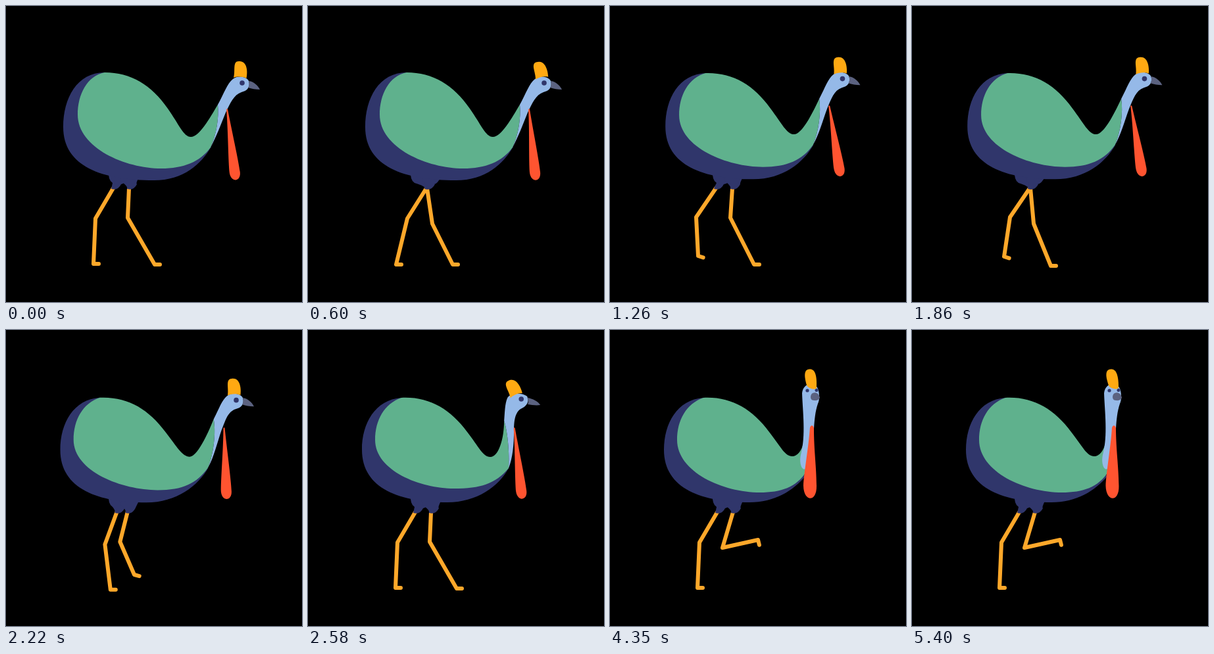
An HTML page that plays this animation: 450 px wide and 450 px high, repeating every 5.43 s.

```html
<!DOCTYPE html>
<html>
<head>
<meta charset="utf-8">
<style>
html, body { margin: 0; width: 100%; height: 100%; overflow: hidden; background: #000 }
svg { display: block; width: 100vw; height: 100vh }
.leg { fill: none; stroke: #ffa82a; stroke-width: 6; stroke-linecap: round; stroke-linejoin: round }
.navy { fill: #30366b }
</style>
</head>
<body>
<svg viewBox="0 0 450 450">
  <path id="legA" class="leg"/><path id="legB" class="leg"/>
  <path id="thighA" class="navy"/><path id="thighB" class="navy"/>
  <path id="body" class="navy"/>
  <path id="back" fill="#5fb18d"/>
  <path id="neck" fill="#95b9e8"/>
  <path id="beak" fill="#5b6280"/>
  <circle id="eye" class="navy"/><circle id="eye2" class="navy"/>
  <path id="casque" fill="#ffa912"/>
  <path id="wattle" fill="#ff5430"/>
</svg>
<script>
const LOOP = 5430, STEP = 30, STOP = 2400, CYCLE = 1200;
const el = id => document.getElementById(id);
const clamp = x => Math.max(0, Math.min(1, x));
const lerp = (a, b, k) => a + (b - a) * k;
const easeOut = x => 1 - (1 - clamp(x)) ** 3;
const easeInOut = x => (x = clamp(x)) < .5 ? 2 * x * x : 1 - 2 * (1 - x) ** 2;

// Interpolates every number in two strings of the same form.
function mix(a, b, k) {
  const nums = b.match(/-?[\d.]+/g);
  let i = 0;
  return a.replace(/-?[\d.]+/g, n => lerp(+n, +nums[i++], k).toFixed(2));
}

// Poses: head low, head high, upright, facing the viewer.
const shapes = {
  body: [
    'M150 101C108 101 87 140 87 184C87 244 146 265 225 265C270 265 297 240 312 214L200 200Z',
    'M142 103C102 106 82 142 82 182C82 242 141 262 212 262C258 262 292 236 307 209L200 200Z',
    'M142 103C102 106 82 142 82 182C82 242 141 262 212 262C256 262 290 238 305 210L200 200Z',
    'M142 103C102 106 82 142 82 182C82 242 141 262 212 262C250 262 278 245 298 221L200 200Z'],
  back: [
    'M150 101C190 101 221 120 246 156C263 180 270 199 281 199C294 199 310 170 322 150C324 170 320 195 311 215C295 237 270 247 236 247C182 247 109 216 109 165C109 135 123 106 150 101Z',
    'M142 103C184 101 216 120 242 155C260 178 268 192 279 192C290 192 305 160 315 134C319 155 315 188 307 208C290 233 268 243 230 243C176 243 102 215 102 167C102 137 116 112 142 103Z',
    'M142 103C184 101 216 120 242 155C260 178 266 193 277 193C290 193 298 165 298 138C305 160 306 195 305 210C285 234 262 241 222 241C171 241 102 214 102 167C102 137 116 112 142 103Z',
    'M142 103C184 101 216 120 242 155C260 178 266 192 277 192C285 192 291 184 294 172C302 185 300 205 298 216C283 239 260 247 228 247C172 247 102 216 102 167C102 137 116 112 142 103Z'],
  neck: [
    'M322 150C332 132 336 118 345 111C352 105 366 107 369 114C372 124 366 129 358 131C346 135 341 148 334 162C326 182 320 198 311 215C320 195 324 170 322 150Z',
    'M315 134C324 116 327 106 335 99C342 93 356 95 359 102C362 112 356 117 348 119C336 123 333 136 327 151C320 172 316 192 307 208C315 188 319 155 315 134Z',
    'M298 138C299 126 299 112 303 103C308 95 326 95 333 101C337 110 331 116 325 119C314 124 313 140 313 152C313 175 311 195 305 210C306 195 305 160 298 138Z',
    'M290 190C298 160 293 125 292 96C294 78 314 78 317 92C319 102 318 108 316 112C312 124 311 136 310 150C309 175 305 200 298 210C293 216 287 204 290 190Z'],
  beak: [
    'M369 114C377 115 383 121 386 127C380 127 373 126 368 124C370 121 370 117 369 114Z',
    'M359 102C367 103 373 109 376 115C370 115 363 114 358 112C360 109 360 105 359 102Z',
    'M333 103C341 104 350 109 353 114C347 115 340 114 334 113C335 110 335 106 333 103Z',
    'M306 98C309 93 318 95 319 103C319 104 316 108 310 107C305 107 304 102 306 98Z'],
  casque: [
    ...Array(3).fill('M-10 -1C-7 -12 -12 -26 -2 -26C10 -27 12 -12 9.5 0C4 -3 -5 -3 -10 -1Z'),
    'M-6 -4C-9 -13 -14 -29 -2 -29C8 -29 9 -12 9 -1C8 3 -3 1 -6 -4Z'],
  wattle: [
    ...Array(3).fill('M-1 0C-2 30 -8 80 -8 97C-7 112 8 112 8 97C8 80 3 30 1 0C0 -1 0 -1 -1 0Z'),
    'M-3 4C-4 30 -11 75 -11 92C-10 117 10 117 9 92C8 60 4 40 3 4C2 -1 -2 -1 -3 4Z']
};
const eyePose = ['359 117 3.8', '349 105.5 3.8', '324 105 3.8', '300 92 2.6'];
const eye2Pose = ['369 117 0', '359 105 0', '333 104 0', '314 91.5 2.5'];
const casquePose = ['356 110', '346 98.5', '317 100', '305 88.5'];
const wattlePose = ['336 157 -7', '331 148 -7', '313.5 149 -6.3', '307 145 1'];

// Leg keys: hip x, knee x, knee y, foot x, foot y, toe angle.
const phases = [0, .05, .25, .5, .55, .75, .9];
const keysA = [
  [181, 189, 331, 220, 393, 0], [180, 185, 331, 211, 395, 0],
  [172, 160, 328, 176, 396.5, 0], [163, 136, 323, 133, 392, 0],
  [161, 131, 321, 134, 380, 17], [168, 150, 322, 160, 366, 35],
  [178, 182, 325, 205, 375, 5]];
const keysB = [
  [187, 185, 322, 226, 393, 0], [186, 183, 322, 219, 393, 0],
  [183, 165, 324, 178, 395.5, 0], [180, 151, 323, 134, 393, 0],
  [179, 149, 321, 140, 381, 17], [182, 160, 322, 165, 366, 35],
  [186, 180, 322, 210, 375, 5]];
const raised = [187, 171, 331, 225, 319, 76];

function legAt(keys, phase) {
  phase %= 1;
  const n = phases.length;
  let i = n - 1;
  while (phases[i] > phase) i--;
  const end = i + 1 < n ? phases[i + 1] : 1;
  const k = (phase - phases[i]) / (end - phases[i]);
  return keys[i].map((v, j) => lerp(v, keys[(i + 1) % n][j], k));
}

function drawLeg(name, [hip, kx, ky, fx, fy, toe], base) {
  const a = toe * Math.PI / 180;
  el('leg' + name).setAttribute('d',
    `M${hip} 277L${kx} ${ky}L${fx} ${fy}l${8 * Math.cos(a)} ${8 * Math.sin(a)}`);
  el('thigh' + name).setAttribute('d',
    `M${base - 15} 250Q${base - 16} 265 ${base - 9} 269Q${hip - 2} 274 ${hip - 3} 278` +
    `Q${hip + 7} 281 ${hip + 12} 271Q${base + 10} 270 ${base + 15} 260L${base} 250Z`);
}

function draw(t) {
  const walk = Math.min(t, STOP), p = walk / 600 % 1;
  const bob = Math.sqrt(Math.sin(Math.PI * p));
  const rise = easeOut((t - STOP) / 220);
  const turn = easeInOut((t - 2780) / 450);
  const pose = s => mix(mix(mix(s[0], s[1], bob), s[2], rise), s[3], turn);
  const nums = s => pose(s).split(' ').map(Number);

  for (const id in shapes) el(id).setAttribute('d', pose(shapes[id]));
  for (const [id, s] of [['eye', eyePose], ['eye2', eye2Pose]]) {
    const v = nums(s);
    ['cx', 'cy', 'r'].forEach((name, i) => el(id).setAttribute(name, v[i]));
  }

  // Casque and wattle trail the head, then swing out.
  const start = clamp(t / 300), w = 2 * Math.PI;
  const fade = Math.exp(-(t - 3450) / 600), swing = w * (t - 3450) / 600;
  const tilt = lerp(lerp(-17 * start * Math.cos(w * p + .57), -25, rise),
    -12 * fade * Math.cos(swing), turn);
  const sway = lerp(6 * start * Math.cos(w * p + 1.3) * (1 - rise),
    -1.7 * fade * Math.cos(swing - .9), turn);
  const [cx, cy] = nums(casquePose);
  el('casque').setAttribute('transform', `translate(${cx} ${cy}) rotate(${tilt})`);
  const [wx, wy, rest] = nums(wattlePose);
  el('wattle').setAttribute('transform', `translate(${wx} ${wy}) rotate(${rest + sway})`);

  const lift = easeInOut((t - 2850) / 450);
  drawLeg('A', legAt(keysA, walk / CYCLE + .5), 171);
  drawLeg('B', legAt(keysB, walk / CYCLE).map((v, i) => lerp(v, raised[i], lift)), 187);
}

function frame() {
  draw(Math.floor(performance.now() % LOOP / STEP) * STEP);
  requestAnimationFrame(frame);
}
frame();
</script>
</body>
</html>
```
